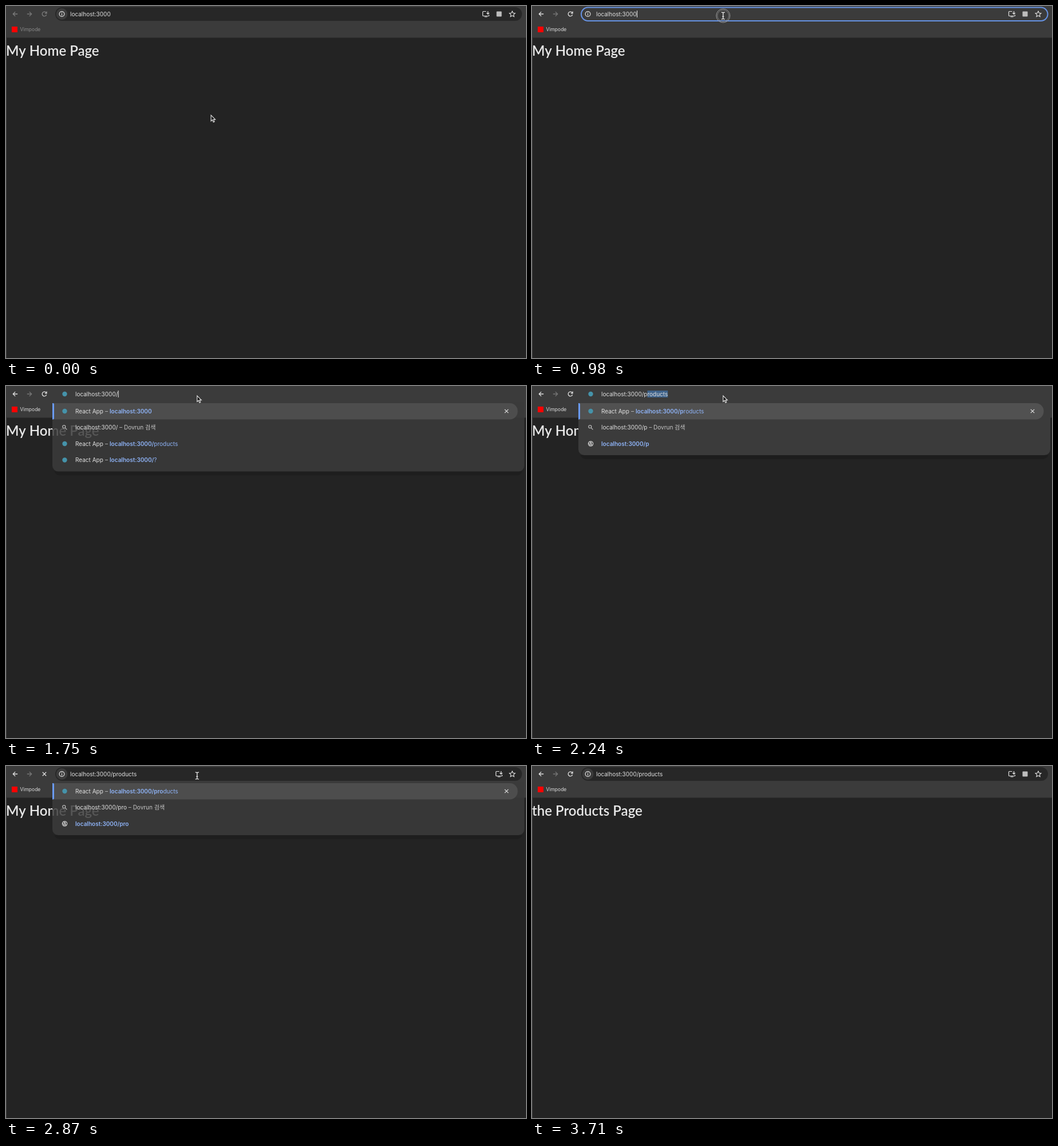
An HTML page with a canvas for the animation above (3.78 s loop, 908 by 616 pixels).

```html
<!DOCTYPE html>
<html lang="en">
<head>
<meta charset="utf-8">
<title>Address bar navigation</title>
<style>
html, body { margin: 0; width: 100%; height: 100%; overflow: hidden; background: #232323; }
canvas { display: block; }
</style>
</head>
<body>
<canvas id="stage" width="908" height="616"></canvas>
<script>
const c = document.getElementById('stage').getContext('2d');
const LOOP = 3780, STEP = 70;
const UI = 'Inter, "Noto Sans CJK KR", "Noto Sans CJK", sans-serif';
const TOOLBAR = '#3b3b3b', FIELD = '#272727', PAGE = '#232323';
const BRIGHT = '#e0e0e0', SOFT = '#c7c7c7', DIM = '#777', BLUE = '#8fb4f8';
const HOST = 'localhost:3000';

function text(str, x, y, color = BRIGHT, weight = 400, size = 10) {
  c.font = `${weight} ${size}px ${UI}`;
  c.fillStyle = color;
  c.fillText(str, x, y);
  return x + c.measureText(str).width;
}
function box(x, y, w, h, color, radii = 0) {
  c.fillStyle = color;
  c.beginPath();
  c.roundRect(x, y, w, h, radii);
  c.fill();
}
function dot(x, y, r, color) {
  c.fillStyle = color;
  c.beginPath();
  c.arc(x, y, r, 0, 7);
  c.fill();
}
// Strokes an SVG path placed at (x, y).
function icon(d, x, y, color, width = 1.3, fill) {
  c.save();
  c.translate(x, y);
  const p = new Path2D(d);
  if (fill) { c.fillStyle = fill; c.fill(p); }
  c.strokeStyle = color;
  c.lineWidth = width;
  c.stroke(p);
  c.restore();
}
const circle = r => `M${-r} 0a${r} ${r} 0 1 0 ${2 * r} 0a${r} ${r} 0 1 0 ${-2 * r} 0`;

const BACK = 'M4.2 0H-3.6M.2-3.9L-3.7 0L.2 3.9';
const FORWARD = 'M-4.2 0H3.6M-.2-3.9L3.7 0L-.2 3.9';
const RELOAD = 'M3.6 1.2A3.8 3.8 0 1 1 2.8-2.6L3.8-1.4M4-4.4V-1.2H.9';
const CROSS = 'M-3.2-3.2L3.2 3.2M3.2-3.2L-3.2 3.2';
const INSTALL = 'M.5-4.5H-4.5Q-5.5-4.5-5.5-3.5V2.5Q-5.5 3.5-4.5 3.5H4.5Q5.5 3.5 5.5 2.5V1.5M-2.5 5H2.5M3.5-5V0M1.2-2L3.5.3L5.8-2';
const STAR = 'M0-5L1.5-1.7L5-1.3L2.4 1.1L3.1 4.6L0 2.8L-3.1 4.6L-2.4 1.1L-5-1.3L-1.5-1.7Z';
const LENS = 'M1.3-1.2A2.5 2.5 0 1 1-3.7-1.2A2.5 2.5 0 1 1 1.3-1.2M.7.7L3.9 3.9';
const LAND = 'M-4-1L-1 2V4M-1-4V-2H1V0H-1M1 0V2H3';
const ARROW = 'M0 0V10.4L2.4 8.2L4.2 12.3L6 11.5L4.3 7.6H7.5Z';
const IBEAM = 'M-3-6Q0-6 0-4.5Q0-6 3-6M0-4.5V4.5M-3 6Q0 6 0 4.5Q0 6 3 6M-1.5 1.5H1.5';

function toolbar(t, typing) {
  const active = t >= 490;
  const lit = active ? BRIGHT : '#7d7d7d';
  box(0, 0, 908, 55.5, TOOLBAR);
  icon(BACK, 16, 14, lit);
  icon(FORWARD, 41, 14, DIM);
  icon(t >= 2870 && t < 2940 ? CROSS : RELOAD, 67, 14, lit);
  box(10, 36, 10, 10, '#f00');
  text('Vimpode', 24.5, 43.7, active ? '#dcdcdc' : '#8a8a8a', 400, 8.5);
  if (!typing) field(t);
}

function field(t) {
  const focused = t >= 560 && t < 1680;
  const loading = t >= 2870 && t < 2940;
  if (focused) {
    c.strokeStyle = '#6793e4';
    c.lineWidth = 2;
    c.beginPath();
    c.roundRect(86, 2.5, 814.5, 23.5, 12);
    c.stroke();
  } else {
    box(86, 2, 815, 24, FIELD, 12);
    dot(97.5, 14, 10, TOOLBAR);
  }
  icon(circle(4.4), 97.5, 14, BRIGHT, 1.2);
  icon('M0-2.6V-1.2M0-.4V2.6', 97.5, 14, BRIGHT, 1.2);
  const url = t < 2870 ? HOST : HOST + '/products';
  if (focused && t < 980) box(112, 8, 71.5, 12, '#3f638b');
  const end = text(url, 112, 17.7);
  if (t >= 980 && t < 1540) box(end + .3, 8, 1, 12, '#eee');
  icon(INSTALL, loading ? 861 : 838, 14, BRIGHT, 1.2);
  if (!loading) box(856.5, 9.5, 9, 9, '#bdbdbd', 1);
  icon(STAR, 884, 14, BRIGHT, 1.1);
}

function favicon(y) { dot(102.5, y, 4.2, '#4593aa'); }

function entry(typed) {
  favicon(14);
  const end = text(HOST + '/' + typed, 121, 17.7);
  if (!typed) return box(end + .3, 8, 1, 12, '#eee');
  const rest = 'products'.slice(typed.length);
  box(end, 8, c.measureText(rest).width, 12, '#3f638b');
  text(rest, end, 17.7);
}

function suggestion(y, bold, plain) {
  favicon(y);
  text('React App', 121, y + 3.7);
  text('–', 173, y + 3.7, SOFT);
  text(plain, text(bold, 181, y + 3.7, BLUE, 600), y + 3.7, BLUE);
}

function dropdown(typed, alpha) {
  const bottom = typed ? 121 : 149.5;
  c.globalAlpha = alpha;
  // The shadow only shows below the panel, so the fading panel stays see-through.
  c.save();
  c.beginPath();
  c.rect(81, bottom, 824, 10);
  c.clip();
  box(84, bottom - 20, 818, 27, '#1d1d1d', 10);
  c.restore();
  box(81, 28, 824, bottom - 28, TOOLBAR, [0, 0, 10, 10]);
  c.globalAlpha = 1;
  box(81, 30, 812.5, 28.5, alpha < 1 ? '#4d4d4d' : '#515151', [0, 14, 14, 0]);
  box(81, 30, 3, 28.5, '#6a9bf3', [0, 2, 2, 0]);
  icon(CROSS, 874, 44, BRIGHT, 1.2);
  if (typed) suggestion(44, HOST + '/' + typed, 'products'.slice(typed.length));
  else suggestion(44, HOST, '');
  icon(LENS, 102.5, 72.5, SOFT, 1.1);
  text(' – Dovrun 검색', text(HOST + '/' + typed, 121, 76.2), 76.2, SOFT);
  if (typed) {
    icon(circle(4.2), 102.5, 101, SOFT, 1.2);
    icon(LAND, 102.5, 101, SOFT, 1.3);
    text(HOST + '/' + typed, 121, 104.7, BLUE, 600);
  } else {
    suggestion(101, HOST + '/', 'products');
    suggestion(129.5, HOST + '/', '?');
  }
}

const mix = (a, b, k) => a + (b - a) * k;
const ease = k => k * k * (3 - 2 * k);
const bezier = (a, b, d, k) => mix(mix(a, b, k), mix(b, d, k), k);

function pointer(t) {
  if (t < 3150) {
    const k = ease(Math.min(t / 490, 1));
    return [mix(358, 333.7, k), mix(191, 17, k)];
  }
  if (t < 3570) {
    const k = Math.min((t - 3080) / 350, 1);
    return [bezier(333.7, 145, 246, k), bezier(17, 330, 530, k)];
  }
  return t < 3640 ? [312, 573] : [385, 590];
}

function cursor(t, typing) {
  if (t >= 3710) return;
  const [x, y] = pointer(t);
  if (typing || y > 27) icon(ARROW, x, y, '#e8e8e8', 1.1, '#171717');
  else icon(IBEAM, x, y, '#e4e4e4', 1.3);
  if (t === 490 || t === 980) {
    icon(circle(12), x, y, '#a5a5a5', .9);
    icon(circle(10), x, y, '#8c8c8c', .8);
  }
}

function draw(t) {
  const typing = t >= 1680 && t < 2870;
  const typed = t < 2240 ? '' : t < 2450 ? 'p' : t < 2520 ? 'pr' : 'pro';
  box(0, 0, 908, 616, PAGE);
  box(0, 55.5, 1, 561, '#464646');
  c.font = '600 24px Lato, sans-serif';
  c.fillStyle = '#e8e8e8';
  c.fillText(t < 2940 ? 'My Home Page' : 'the Products Page', 0, 87);
  toolbar(t, typing);
  if (typing) entry(typed);
  if (t >= 1750 && t < 2940) dropdown(typed, t < 1820 || t >= 2870 ? .84 : 1);
  cursor(t, typing);
}

function tick() {
  draw(Math.floor(performance.now() % LOOP / STEP) * STEP);
  requestAnimationFrame(tick);
}
tick();
</script>
</body>
</html>
```
